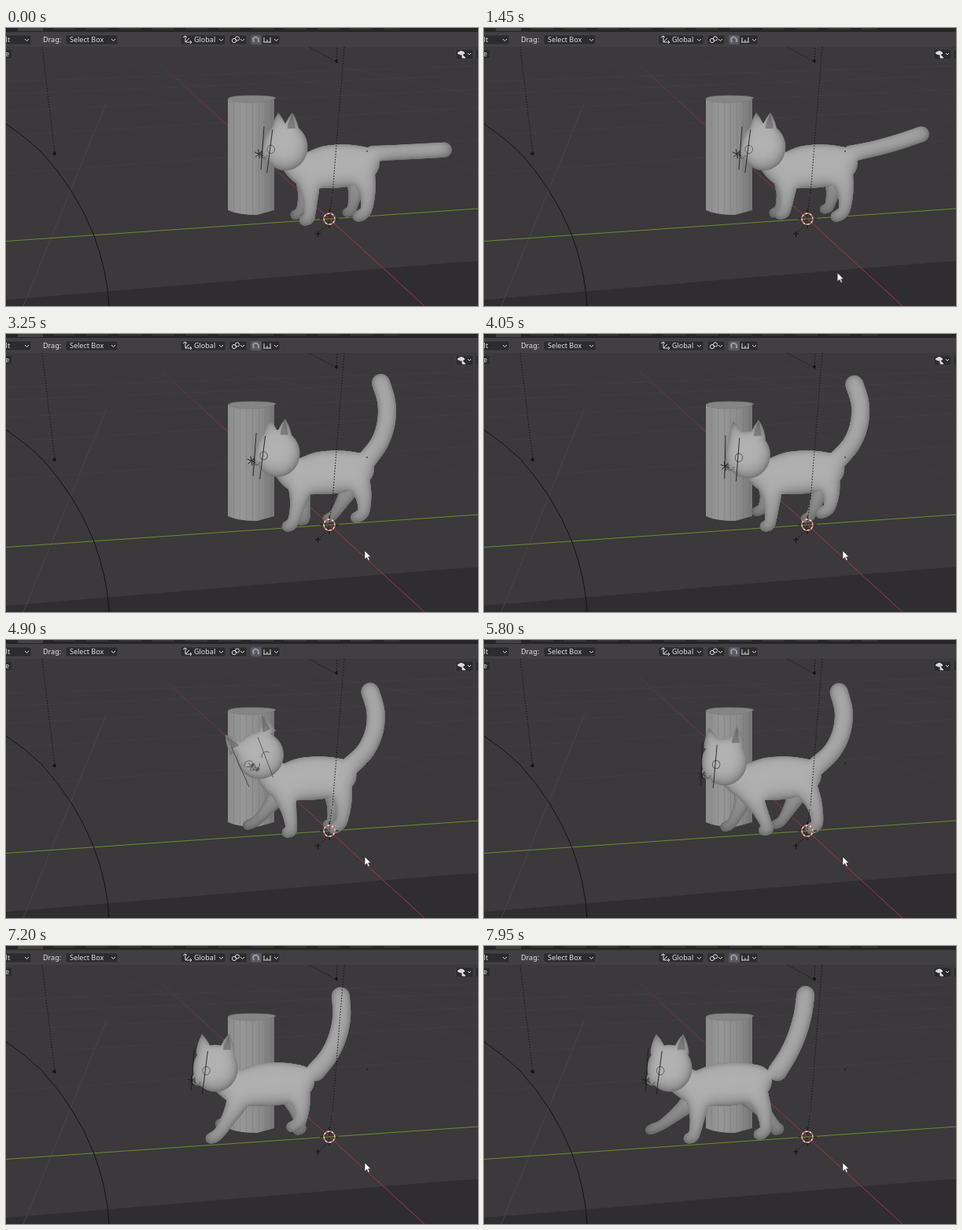
Write an HTML page with a canvas that moves like this. It is 600x354 px and loops after 8 s.

```html
<!DOCTYPE html>
<html lang="en">
<head>
<meta charset="utf-8">
<title>Walking cat viewport</title>
<style>
  html, body { margin: 0; width: 100%; height: 100%; overflow: hidden; background: #3b393b; }
  #stage { position: relative; width: 600px; height: 354px; overflow: hidden; }
  #stage > * { position: absolute; left: 0; top: 0; }
  text { font: 9px "Noto Sans", "Open Sans", sans-serif; fill: #e2e2e2; }
  .box { fill: #2c2b2d; stroke: #4c4b4d; stroke-width: .6; }
  .line { fill: none; stroke: #ddd; stroke-width: 1; }
  .wire { fill: none; stroke: #131313; stroke-width: 1; }
  .dots { stroke-dasharray: 1.5 2; }
  #pointer { animation: enter 8s linear infinite; }
  @keyframes enter {
    0%, 15.62% { transform: translate(440px, 360px); }
    20%, 100% { transform: translate(456px, 276px); }
  }
</style>
</head>
<body>
<div id="stage">
  <svg width="600" height="354">
    <defs>
      <linearGradient id="post">
        <stop offset="0" stop-color="#8c8c8c"/>
        <stop offset=".3" stop-color="#979797"/>
        <stop offset=".7" stop-color="#8c8c8c"/>
        <stop offset="1" stop-color="#767676"/>
      </linearGradient>
      <linearGradient id="red" gradientUnits="userSpaceOnUse" x1="198" y1="47" x2="420" y2="252">
        <stop offset="0" stop-color="#55393d"/>
        <stop offset=".4" stop-color="#7a3843"/>
        <stop offset="1" stop-color="#a0384c"/>
      </linearGradient>
      <pattern id="facets" width="8" height="200" x="282" patternUnits="userSpaceOnUse">
        <path d="M7.500 0V200" stroke="#707070" stroke-opacity=".4"/>
      </pattern>
    </defs>
    <rect width="600" height="354" fill="#3b393b"/>
    <path d="M0 346L565 299L600 297V354H0Z" fill="#2f2d30"/>
    <g fill="none" stroke="#474547">
      <path d="M128 94L22 354"/>
      <path d="M0 185L600 142M0 137L600 101M0 106L600 78M0 84L600 60M0 68L600 48" stroke-opacity=".5"/>
      <path d="M150 44L600 184M270 40L600 122M380 40L600 86" stroke-opacity=".4"/>
    </g>
    <path d="M198 47.500L532 354" stroke="url(#red)"/>
    <path d="M0 271.500L600 230" stroke="#668f2c"/>
    <g id="pillar">
      <path d="M282 90V232Q295 238 319 238L341 232V90Z" fill="url(#post)"/>
      <path d="M282 90V232Q295 238 319 238L341 232V90Z" fill="url(#facets)"/>
      <path d="M282 90Q285 86 312 86T343 89Q334 94.500 312 95T282 90Z" fill="#858585" stroke="#777" stroke-width=".6"/>
    </g>
  </svg>

  <canvas id="cat" width="600" height="354"></canvas>

  <svg width="600" height="354">
    <g class="wire">
      <path d="M0 122Q24 138 45 158Q88 205 111 262Q129 310 131 354"/>
      <path class="dots" d="M46 24L62 160M430 24L415 212M414 216L410 250L396 262"/>
      <path class="dots" d="M385 24L420 43L421 24"/>
      <path d="M393 262h7M396.500 259v7"/>
      <path d="M59 160l4-2v4zM418 42l3-2v4z" fill="#131313"/>
      <path d="M458 157h2"/>
    </g>
    <g fill="none">
      <path d="M399 243h6M417 243h6M411 231v6M411 249v6" stroke="#131313"/>
      <circle cx="411" cy="243" r="7" stroke="#eee" stroke-width="1.3"/>
      <circle cx="411" cy="243" r="7" stroke="#d23b32" stroke-width="1.3" stroke-dasharray="2.75"/>
    </g>

    <rect width="600" height="24" fill="#413f41"/>
    <rect width="600" height="5" fill="#262527"/>
    <path d="M15 0h32v4h-32z" fill="#434143"/>
    <path d="M60 1H500" stroke="#777" stroke-opacity=".4" stroke-dasharray="28 14"/>
    <g class="box">
      <rect x="-5" y="9" width="37" height="12" rx="2"/>
      <rect x="76" y="9" width="66" height="12" rx="2"/>
      <rect x="222" y="9" width="57" height="12" rx="2"/>
      <rect x="284" y="9" width="22" height="12" rx="2"/>
      <rect x="311" y="9" width="14" height="12" rx="2" fill="#5a5a5e"/>
      <rect x="325" y="9" width="23" height="12" rx="2"/>
      <rect x="-5" y="27" width="13" height="12" rx="2"/>
      <rect x="572" y="27" width="22" height="13" rx="2"/>
      <rect x="597" y="27" width="12" height="13" rx="2"/>
    </g>
    <text x="-6" y="18">ult</text>
    <text x="47" y="18">Drag:</text>
    <text x="81" y="18">Select Box</text>
    <text x="239" y="18">Global</text>
    <text x="-1" y="36">e</text>
    <g class="line">
      <path d="M24 14l2.500 2.500l2.500-2.500M134 14l2.500 2.500l2.500-2.500M271 14l2.500 2.500l2.500-2.500M298 14l2.500 2.500l2.500-2.500M341 14l2.500 2.500l2.500-2.500M587 32l2 2l2-2"/>
      <path d="M228 10v8h8M225 12l3-2l2 2M234 16l2 2l-2 2M228 18l5-5"/>
      <circle cx="290" cy="16" r="2.600"/>
      <circle cx="294" cy="13.500" r="2.600"/>
      <path d="M315 18l-1-4q3-5 7 0v4" stroke="#9a9aa6" stroke-width="2"/>
      <path d="M327 18h10M328 12v6M332 15v3M336 12v6"/>
      <path d="M574 32q5-5 9 0q-4 4-9 0z" fill="#ddd"/>
      <path d="M580 34l4 4l-4 0z" fill="#ddd"/>
    </g>
    <path id="pointer" d="M0 0V11L2.700 8.500L4.500 12.500L6.300 11.700L4.600 7.800H8Z" fill="#fff" stroke="#222" stroke-width=".6"/>
  </svg>
</div>

<script>
const W = 600, H = 354, LOOP = 8000, TAU = Math.PI * 2;
const RISE = 1250, WALK = 2350, END = 7950;
const view = document.getElementById('cat').getContext('2d');
const layer = () => {
  const c = document.createElement('canvas');
  c.width = W; c.height = H;
  return c.getContext('2d');
};
const form = layer(), hollow = layer();

const clamp = k => Math.max(0, Math.min(1, k));
const ease = (t, from, to) => {
  const k = clamp((t - from) / (to - from));
  return k * k * (3 - 2 * k);
};
const mix = (a, b, k) => a + (b - a) * k;

// Paws stay planted between steps of [start, end, distance].
const legs = {
  nearFront: { x: 383, y: 245, bend: 3, steps: [[RISE, 2050, 22], [5700, 7100, 97]] },
  farFront: { x: 371, y: 238, bend: 3, steps: [[RISE, 2050, -7], [3300, 5000, 68], [6600, 8100, 98]] },
  nearHind: { x: 451, y: 240, bend: 7, steps: [[2900, 4900, 32], [6000, 7700, 66]] },
  farHind: { x: 437, y: 235, bend: 2, steps: [[RISE, 3100, 25], [4900, 5700, 38]] }
};

function paw({ x, y, steps }, t) {
  for (const [from, to, length] of steps) {
    x -= length * ease(t, from, to);
    y -= Math.min(12, Math.abs(length) / 2) * Math.sin(Math.PI * clamp((t - from) / (to - from)));
  }
  return [x, y];
}

const dot = (x, y, rx, ry = rx) => {
  form.beginPath();
  form.ellipse(x, y, rx, ry, 0, 0, TAU);
  form.fill();
};

// Smooth tube through [x, y, radius] points.
function tube(pts) {
  const at = i => pts[Math.max(0, Math.min(pts.length - 1, i))];
  for (let i = 0; i < pts.length - 1; i++) {
    const [p, a, b, q] = [at(i - 1), at(i), at(i + 1), at(i + 2)];
    for (let k = 0; k <= 1; k += 1 / 20) {
      dot(...a.map((v, n) => .5 * (2 * v + (b[n] - p[n]) * k
        + (2 * p[n] - 5 * v + 4 * b[n] - q[n]) * k * k
        + (3 * v - p[n] - 3 * b[n] + q[n]) * k * k * k)));
    }
  }
}

// Draws a silhouette, then rounds it off with soft shade from its edges.
function solid(tone, paint, detail) {
  form.clearRect(0, 0, W, H);
  form.fillStyle = tone;
  paint();
  hollow.globalCompositeOperation = 'source-over';
  hollow.fillStyle = '#383838';
  hollow.fillRect(0, 0, W, H);
  hollow.globalCompositeOperation = 'destination-out';
  hollow.drawImage(form.canvas, 0, 0);
  form.save();
  form.globalCompositeOperation = 'source-atop';
  const shade = (blur, alpha, dx, dy) => {
    form.filter = `blur(${blur}px)`;
    form.globalAlpha = alpha;
    form.drawImage(hollow.canvas, dx, dy);
  };
  shade(9, .45, -1, -5);
  shade(3, .5, 0, -.5);
  form.filter = 'none';
  form.globalAlpha = 1;
  if (detail) detail();
  form.restore();
  view.drawImage(form.canvas, 0, 0);
}

function drawLeg(leg, t, hx, hy, size) {
  const [px, py] = paw(leg, t);
  const kx = mix(hx, px, .42) + leg.bend, ky = mix(hy, py, .42);
  tube([[hx, hy, 16 * size], [kx, ky, 10.5 * size],
    [mix(kx, px, .7) + leg.bend * .7, mix(ky, py, .7), 7.4 * size],
    [px + 1, py - 2, 7.3 * size], [px - 4, py, 6.5 * size]]);
}

// The tail curls evenly from its root; it lies level until raised.
function drawTail(x, y, u, raise) {
  const sway = Math.sin(Math.PI * u ** 1.3);
  const start = 58 - 14 * sway, curl = 48 + 15 * sway - 24 * u ** 4;
  const size = mix(.84, 1, raise), step = mix(23, 26.5, raise);
  const pts = [[x, y, 12 * size]];
  for (let i = 0; i < 4; i++) {
    const a = mix(3, start + curl * i / 3, raise) * Math.PI / 180;
    x += step * Math.cos(a);
    y -= step * Math.sin(a);
    pts.push([x, y, 11.5 * size]);
  }
  tube(pts);
}

function drawEar(side, spread, size) {
  const x = side * spread * .85, w = 10 * size, y = mix(-29, -18, size);
  form.beginPath();
  form.moveTo(x - w, y);
  form.quadraticCurveTo(x - w, y - 12 * size, side * spread, mix(-39, -44, size));
  form.quadraticCurveTo(x + w, y - 12 * size, x + w, y);
  form.fill();
}

function drawFace({ eye, nose, smile }) {
  const [x, y] = nose;
  form.strokeStyle = form.fillStyle = '#5c5c5c';
  const drawEye = cx => {
    form.beginPath();
    if (smile > .5) form.arc(cx, 5, 6, 3.3, 5.9);
    else form.ellipse(cx, 3, 4.8, 5.3, 0, 0, TAU);
    form.stroke();
  };
  drawEye(eye);
  drawEye(eye - 25);
  dot(x, y - 1, 2.5, 1.5);
  form.beginPath();
  form.arc(x - 3, y + 1, 4, .2, 2.2);
  form.moveTo(x + 7, y + 2);
  form.arc(x + 4, y + 1, 4, .2, 2.8);
  form.stroke();
  if (smile > .5) dot(x + 2, y + 7, 3, 2);
}

function drawRig({ eye, nose: [x, y], smile }) {
  const line = (x0, y0, x1, y1) => { view.moveTo(x0, y0); view.lineTo(x1, y1); };
  view.strokeStyle = '#1c1c1c';
  view.lineWidth = .9;
  view.globalAlpha = 1 - .4 * smile;
  view.beginPath();
  line(-27, -26, -31, 29);
  line(eye + 2, -22, eye - 5, 33);
  for (let a = 0; a < 3; a++) {
    const dx = 6 * Math.cos(a + .4), dy = 6 * Math.sin(a + .4);
    line(x - 3 - dx, y - dy, x - 3 + dx, y + dy);
  }
  view.stroke();
}

function draw(t) {
  const u = clamp((t - WALK) / (END - WALK));
  const travel = 60 * u + 52 * u ** 3;
  const smile = Math.exp(-(((u - .455) / .1) ** 2));
  const turn = .05 + .43 * ease(u, .1, .4) + .5 * smile;
  const chest = 380 - travel, rump = chest + mix(75, 78, clamp(u * 6));
  const head = {
    x: 355 - travel - 7 * u ** 6,
    y: 151 + 10 * turn - 14 * smile,
    tilt: -.49 * smile,
    spread: 8 + 19 * turn,
    eye: -19 + 15 * turn + 11 * smile,
    nose: [-31 + 8 * turn + 10 * smile, 8 + 16 * turn - 16 * smile],
    smile
  };
  const inHead = (ctx, paint) => {
    ctx.save();
    ctx.translate(head.x, head.y);
    ctx.rotate(head.tilt);
    paint();
    ctx.restore();
  };
  view.clearRect(0, 0, W, H);

  solid('#9c9c9c', () => {
    drawLeg(legs.farFront, t, chest + 2, 192, .88);
    drawLeg(legs.farHind, t, rump - 9, 192, .85);
  });

  solid('#b0b0b0', () => {
    drawTail(rump + 11 + 16 * u ** 3, 160, u, ease(t, RISE, 2050));
    tube([[head.x + 5, head.y + 8, 18], [chest, 180, 21], [mix(chest, rump, .38), 177, 27],
      [mix(chest, rump, .72), 175, 26.5], [rump, 172, 20.5]]);
    drawLeg(legs.nearFront, t, chest + 4, 190, 1);
    drawLeg(legs.nearHind, t, rump - 2, 184, 1);
  });

  solid('#b2b2b2', () => inHead(form, () => {
    drawEar(-1, head.spread, 1);
    drawEar(1, head.spread, 1);
    dot(0, 0, 28.5 + 2 * smile, 30);
    dot(head.nose[0] * .82, head.nose[1] * .9, 8);
  }), () => inHead(form, () => {
    form.fillStyle = 'rgba(60,60,60,.4)';
    drawEar(1, head.spread, .5);
    if (smile > .3) drawEar(-1, head.spread, .5);
    drawFace(head);
  }));
  inHead(view, () => drawRig(head));
}

function frame() {
  draw(performance.now() % LOOP);
  requestAnimationFrame(frame);
}
frame();
</script>
</body>
</html>
```
